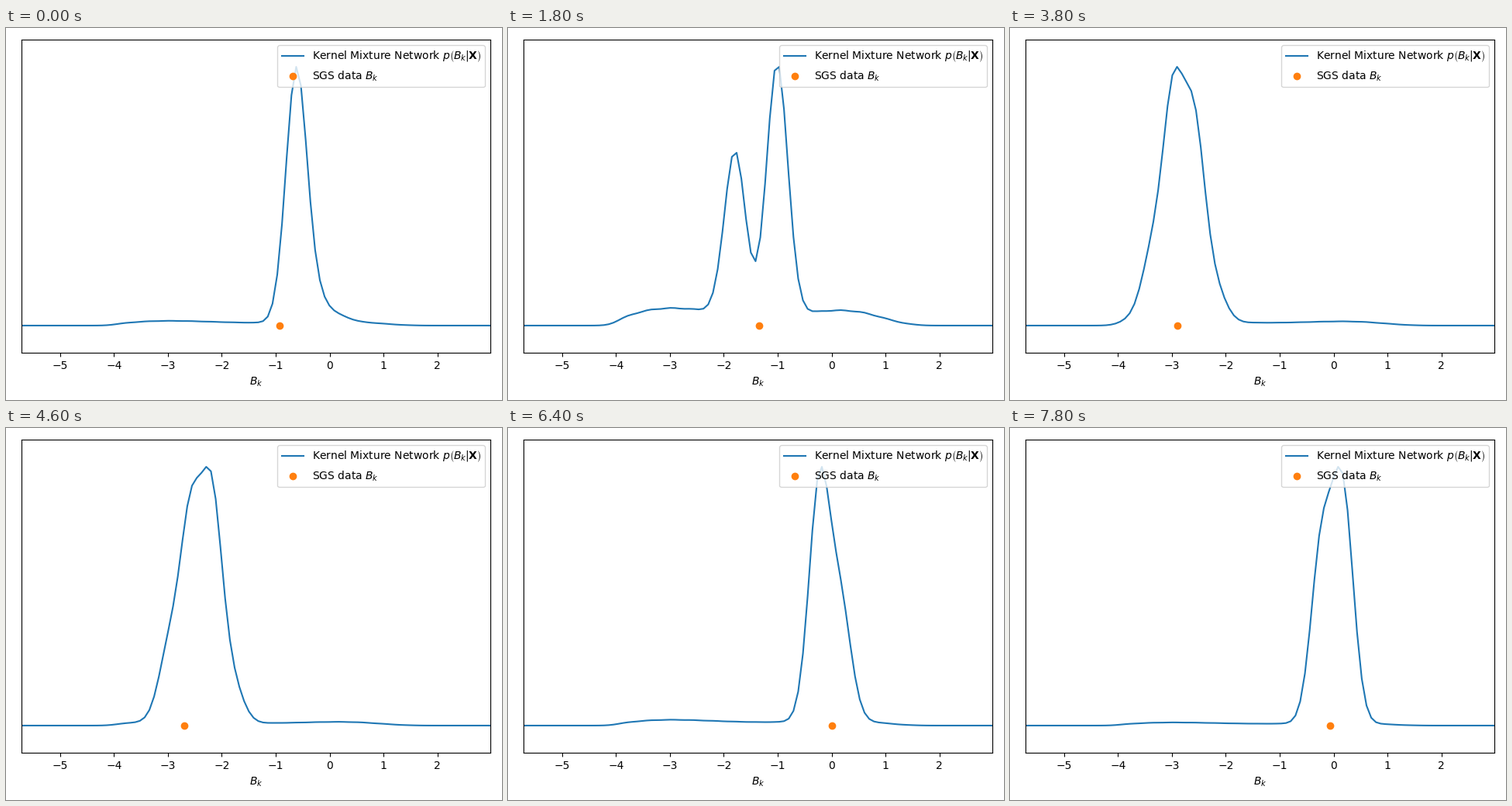
Recreate the animation shown at these times as a matplotlib script. Size 640 by 480 pixels, loop 8000 ms.

```python
import numpy as np
import matplotlib.pyplot as plt
from matplotlib.animation import FuncAnimation

W, H, DPI = 640, 480, 100
FRAMES, INTERVAL = 40, 200
XLIM = (-5.718, 2.9845)

# The network's kernels never move, only their weights change
CENTRES = np.linspace(-3.76, 1.35, 14)
WIDTH = 0.195

# Key points: time, data value, floor level, first active kernel, its weights
KEYS = [
    (0, -0.93, .012, 8, [.95, .075, .02]),
    (9, -1.345, .045, 5, [.62, 0, .96]),
    (14, -2.295, .011, 2, [.15, .93, .255]),
    (23, -2.70, .011, 2, [.27, .74, .835, .135]),
    (28, -1.16, .018, 6, [.85, .7, .35]),
    (32, 0.0, .015, 9, [.91, .42]),
    (39, -0.066, .008, 9, [.66, .86]),
]
TIMES, DATA, LEVELS = np.array([key[:3] for key in KEYS]).T
WEIGHTS = np.zeros((len(KEYS), len(CENTRES)))
for row, (*_, first, active) in zip(WEIGHTS, KEYS):
    row[first:first + len(active)] = active
MEANS = WEIGHTS @ CENTRES / WEIGHTS.sum(axis=1)

# Low background: flat inside the kernel range with a slow ripple
FLOOR = np.exp(-((CENTRES + 1.5) / 2.5) ** 6) * (1 + .3 * np.cos(1.5 * CENTRES + 5))


def locate(t):
    """Index of the key before t and the progress towards the next."""
    i = min(np.searchsorted(TIMES, t, side="right") - 1, len(TIMES) - 2)
    return i, (t - TIMES[i]) / (TIMES[i + 1] - TIMES[i])


def glide(values, t):
    """Smooth cubic path through the key values."""
    i, u = locate(t)
    slope = np.gradient(values, TIMES) * (TIMES[i + 1] - TIMES[i])
    return ((1 + 2 * u) * (1 - u) ** 2 * values[i]
            + u * (1 - u) ** 2 * slope[i]
            + u * u * (3 - 2 * u) * values[i + 1]
            + u * u * (u - 1) * slope[i + 1])


def kernel_weights(t):
    """Slide both neighbouring profiles along the path and cross-fade them."""
    i, u = locate(t)
    mean = glide(MEANS, t)
    before, after = (np.interp(CENTRES - mean + MEANS[k], CENTRES, WEIGHTS[k])
                     for k in (i, i + 1))
    level = np.interp(t, TIMES, LEVELS)
    return (1 - u) * before + u * after + level * FLOOR


def density(x, t):
    z = (x[:, None] - CENTRES) / WIDTH
    p = np.exp(-z * z / 2) @ kernel_weights(t)
    return p / p.max()


fig = plt.figure(figsize=(W / DPI, H / DPI), dpi=DPI)
ax = fig.add_axes([20 / W, 61 / H, 605 / W, 404 / H])
ax.set_xlim(*XLIM)
ax.set_ylim(-0.105, 1.105)
ax.set_yticks([])
ax.set_xlabel("$B_k$")

grid = np.linspace(*XLIM, 100)
label = r"Kernel Mixture Network $p\left(B_k |\hspace{-0.1} \mathbf{X}\right)$"
curve, = ax.plot(grid, density(grid, 0), color="C0", label=label)
dot, = ax.plot([DATA[0]], [0], "o", color="C1", label="SGS data $B_k$")
ax.legend(loc="upper right")


def update(n):
    curve.set_ydata(density(grid, n))
    dot.set_xdata([glide(DATA, n)])
    return curve, dot


anim = FuncAnimation(fig, update, frames=FRAMES, interval=INTERVAL,
                     repeat=True, repeat_delay=0)
plt.show()
```
